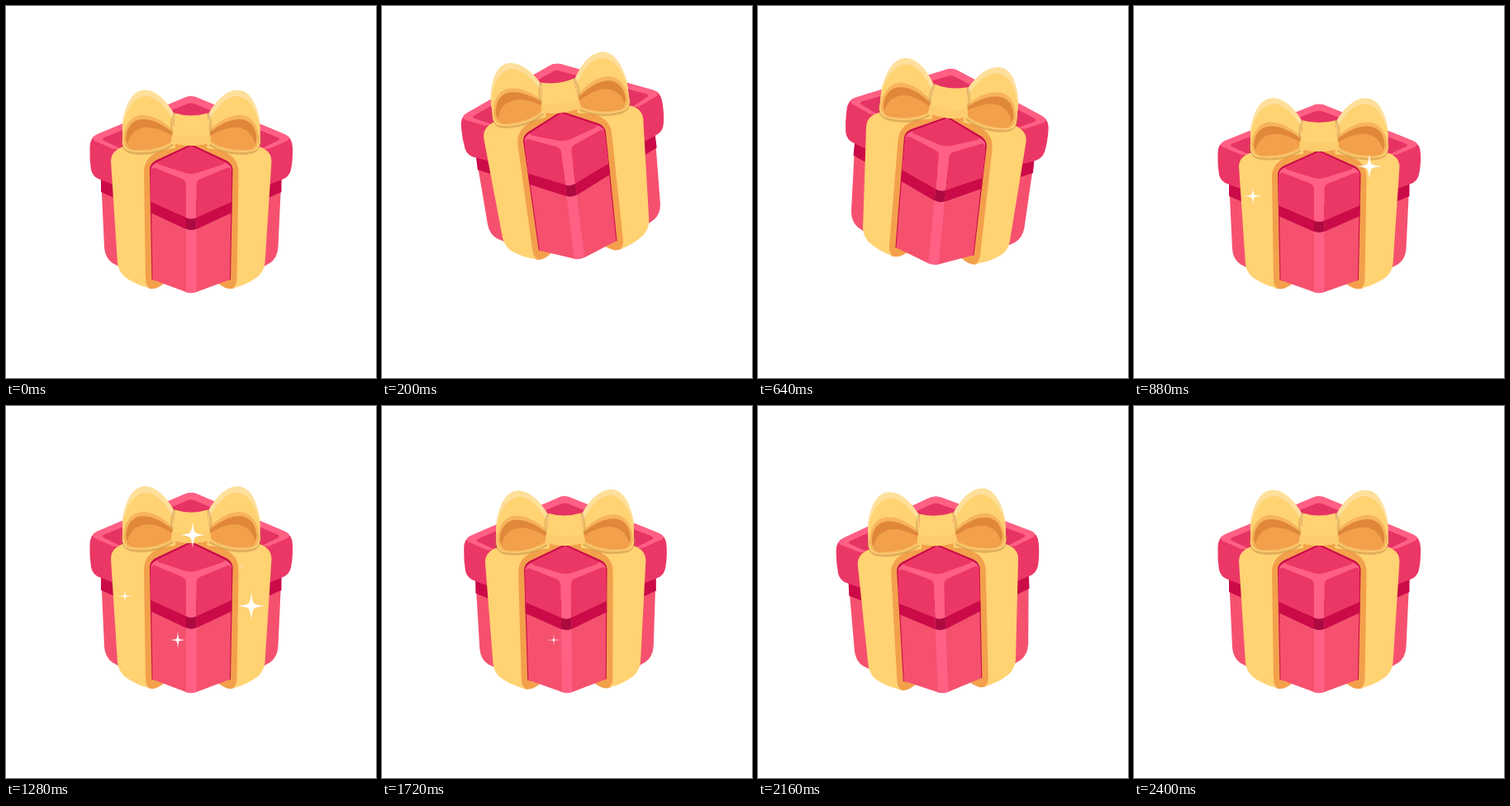
An HTML page that plays this animation: 448 by 450 pixels, repeating every 2440 ms.

```html
<!DOCTYPE html>
<html lang="en">
<head>
<meta charset="utf-8">
<title>Gift box</title>
<style>
  html, body { margin: 0; width: 100%; height: 100%; overflow: hidden; background: #fff; }
  svg { display: block; width: 100%; height: 100%; }
</style>
</head>
<body>
<svg viewBox="0 0 448 450">
  <defs>
    <g id="side">
      <path fill="#f5516f" d="M115 205L119 292Q120 305 129 311L140 317H190V205Z"/>
      <path fill="#ca0b48" d="M115 205V225L140 236H190V205Z"/>
    </g>
    <g id="ribbon">
      <path fill="#f3a04b" d="M225 160H200Q166 174 166 203L167 335Q170 343 178 342Q183 342 191 336L225 180Z"/>
      <path fill="#ffd272" d="M150 168Q127 172 127 188L135 311Q136 320 143 327Q156 337 174 341.5Q169 338 169 330L167 204Q165 175 205 172V164Z"/>
    </g>
    <g id="loop">
      <path fill="none" stroke="#b87835" stroke-opacity=".4" stroke-width="4" d="M141 160Q141 175 153 177Q180 181 202 167"/>
      <path fill="#fedf9b" d="M204 131Q187 102 168 101.5Q148 102 141 140V166Q142 175 154 176Q182 179 202 166Z"/>
      <path fill="#ffd272" d="M203 139Q185 108 168 109Q149 112 141 146V166Q142 175 154 176Q182 179 202 166Z"/>
      <path fill="#f7b45b" d="M202 150Q182 131 163 132Q144 135 142 162Q143 174 154 175Q182 178 202 165Z"/>
      <path fill="#e0873a" d="M202 153Q181 136 164 137Q147 139 145 160Q146 170 152 173Q180 176 201 163Z"/>
      <path fill="#f3a04b" d="M201 157Q181 145 167 147Q151 150 147 167Q150 173 155 173Q181 175 201 163Z"/>
    </g>
    <g id="face">
      <path fill="#f5516f" d="M176 240L177.5 331L218 346V240Z"/>
      <path fill="#ca0b48" d="M175 235V250L218 270V235Z"/>
      <path fill="#eb3765" d="M175.5 202Q175.5 194 181 196L213 209Q218 211 218 217V256L175.5 237Z"/>
    </g>
  </defs>
  <g id="gift">
    <use href="#side"/>
    <use href="#side" class="mirror"/>
    <!-- lid -->
    <path fill="#eb3765" d="M233 111.5Q224 107 215 111.5L111 155Q101 159 101.5 172Q101 186 103 198Q105 207 114 210L140 220H308L334 210Q343 207 345 198Q347.5 186 347 172Q347 159 337 155Z"/>
    <path fill="#ff6084" d="M233 111.5Q224 107 215 111.5L110 155.5Q102 159 107 163L130 173H318L341 163Q346 159 338 155.5Z"/>
    <path fill="#e53363" d="M230 119Q224 116 218 119L119 159Q115 161 119 163L140 173H308L329 163Q333 161 329 159Z"/>
    <use href="#ribbon"/>
    <use href="#ribbon" class="mirror"/>
    <!-- front corner -->
    <path fill="#ca0b48" d="M224 167L181 187Q174 191 174 198L176.5 331L224 340L272 331L274.5 198Q274 191 267 187Z"/>
    <path fill="#ff6084" d="M224 169.5L184 188.5Q175.5 192 175.5 198V240L217 258V346Q224 348.5 231 346V258L273 240V198Q273 192 264 188.5Z"/>
    <path fill="#eb3765" d="M224 169.5L185 188Q181 190 186 192L217 202Q224 204 231 202L262 192Q267 190 263 188Z"/>
    <use href="#face"/>
    <use href="#face" class="mirror"/>
    <path fill="#ad0a40" d="M218 256Q224 259 230.5 256V269.5Q224 272.5 218 269.5Z"/>
    <!-- bow -->
    <use href="#loop"/>
    <use href="#loop" class="mirror"/>
    <path fill="#ffd272" d="M204 129.5Q224 135.5 244.5 129.5Q244.5 147 248.5 165Q224 173 200 165Q204 147 204 129.5Z"/>
    <path fill="#fdcc6c" d="M201 155Q224 161 247 155L248.5 165Q224 173 200 165Z"/>
    <path fill="none" stroke="#c99b4e" stroke-opacity=".45" stroke-width="3" d="M204 130Q199 140 201 153M244.5 130Q249.5 140 247.5 153"/>
  </g>
  <path id="stars" fill="#fff"/>
</svg>
<script>
const LOOP = 2440, FRAME = 40, KEY = 200;
const gift = document.getElementById('gift');
const stars = document.getElementById('stars');

for (const half of document.querySelectorAll('.mirror'))
  half.setAttribute('transform', 'translate(448.5 0) scale(-1 1)');

// One value per 200 ms
const angles = [0, -7, 0, 7, 0, 0, 0, 0, 3.8, -3.8, 3.8, -3.8, 0, 0];
const heights = [1, 1, 1, 1, 1, .9, 1.03, 1, 1, 1, 1, 1, 1, 1];

// x, y, radius, start, end
const sparkles = [
  [285, 194, 16, 680, 1290],
  [144, 230, 12.5, 740, 1360],
  [226, 156, 15.5, 1040, 1600],
  [297, 242, 17, 1060, 1640],
  [208, 283, 11.5, 1120, 1790]
];

function tween(keys, t) {
  const i = Math.floor(t / KEY);
  return keys[i] + (keys[i + 1] - keys[i]) * (t / KEY - i);
}

function star([x, y, radius, start, end], t) {
  const u = (t - start) / (end - start);
  if (u <= 0 || u >= 1) return '';
  const glow = Math.sin(Math.PI * u);
  const r = radius * glow ** .3, w = radius * .2 * glow, k = w * .35;
  const corner = (c, s) => {
    const p = (a, b) => `${x + a * c - b * s} ${y + a * s + b * c}`;
    return `Q${p(k, -w * 1.8)} ${p(w, -w)}Q${p(w * 1.8, -k)} ${p(r, 0)}`;
  };
  return `M${x} ${y - r}` + corner(1, 0) + corner(0, 1) + corner(-1, 0) + corner(0, -1) + 'Z';
}

function draw(now) {
  const t = Math.floor(now % LOOP / FRAME) * FRAME;
  const jump = t < 800 ? 58 * (1 - Math.abs(t / 400 - 1) ** 1.7) : 0;
  const pivot = t < 800 ? 225 : 347;
  gift.setAttribute('transform',
    `translate(0 ${-jump}) rotate(${tween(angles, t)} 224 ${pivot}) ` +
    `translate(0 347) scale(1 ${tween(heights, t)}) translate(0 -347)`);
  stars.setAttribute('d', sparkles.map(s => star(s, t)).join(''));
}

const begin = performance.now();
function tick() {
  draw(performance.now() - begin);
  requestAnimationFrame(tick);
}
tick();
</script>
</body>
</html>
```
